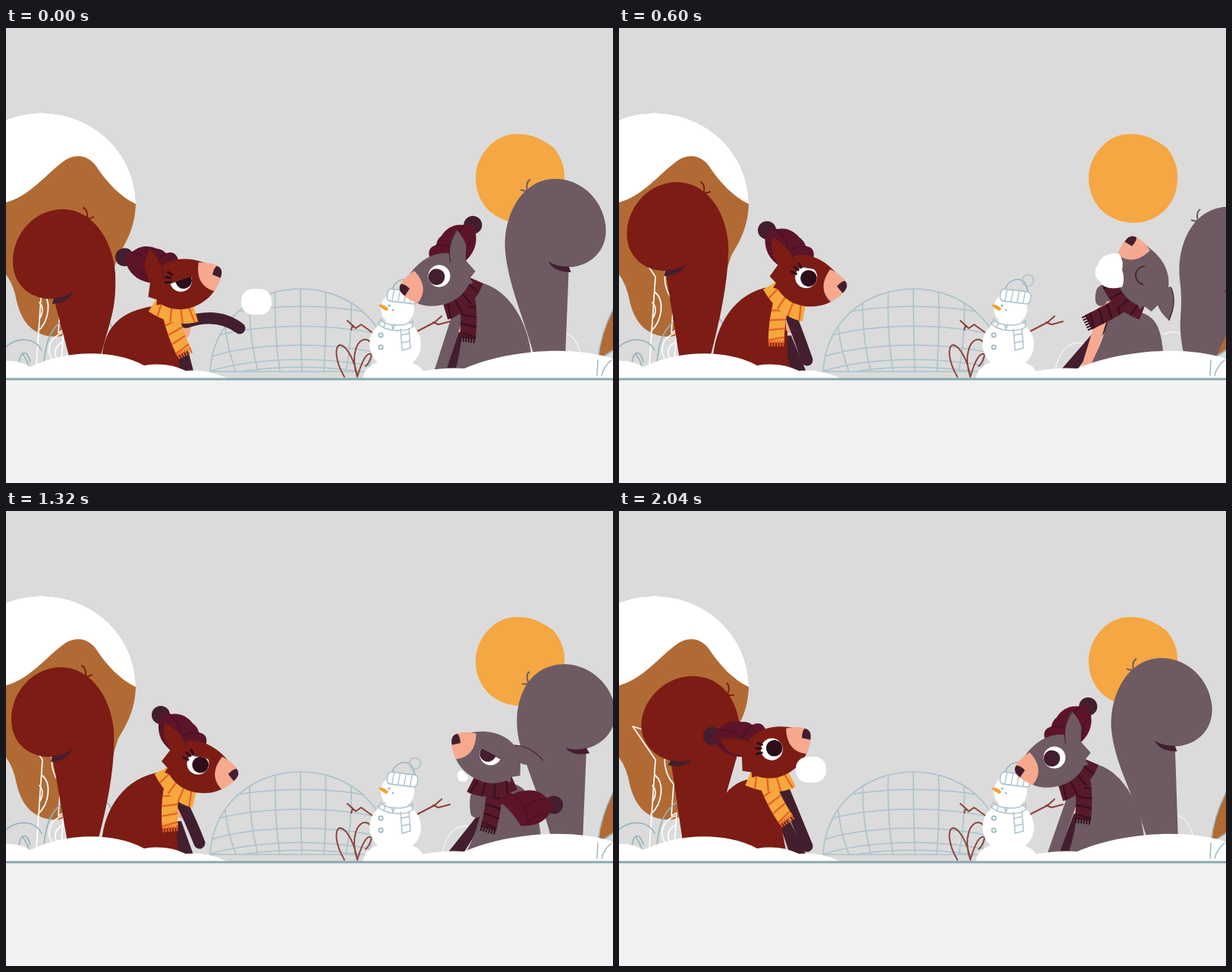
Recreate the animation shown at these times as an HTML page with a canvas. Size 800x600 px, loop 2160 ms.

```html
<!DOCTYPE html>
<html lang="en">
<head>
<meta charset="utf-8">
<title>Snowball fight</title>
<style>
html, body { margin: 0; width: 100%; height: 100%; overflow: hidden; background: #dbdbdb; }
canvas { display: block; width: 800px; height: 600px; }
</style>
</head>
<body>
<canvas id="stage" width="800" height="600"></canvas>
<script>
const c = document.getElementById('stage').getContext('2d');
const LOOP = 2160, STEP = 60;
const HOLDS = [1560, 1860, 1980, 2100];
const RAD = Math.PI / 180;
const DARK = '#431e2e', INK = '#2d0d19', WINE = '#5c1429', PINK = '#f6a98f';
const ICE = '#a9c3cd', TEAL = '#94b3bb', BROWN = '#b16a34';

const clamp = v => Math.max(0, Math.min(1, v));
const mix = (a, b, k) => a + (b - a) * k;

function spin(x, y, deg) {
  const cos = Math.cos(deg * RAD), sin = Math.sin(deg * RAD);
  return [x * cos - y * sin, x * sin + y * cos];
}
function fill(d, color) { c.fillStyle = color; c.fill(new Path2D(d)); }
function line(d, color, width = 2, cap = 'round') {
  c.strokeStyle = color; c.lineWidth = width; c.lineCap = cap; c.lineJoin = 'round';
  c.stroke(new Path2D(d));
}
function oval(x, y, rx, ry, color) {
  c.fillStyle = color; c.beginPath(); c.ellipse(x, y, rx, ry, 0, 0, 7); c.fill();
}
function dot(x, y, r, color) { oval(x, y, r, r, color); }
function ring(x, y, r, color, from = 0, to = 7) {
  c.strokeStyle = color; c.lineWidth = 1.6; c.beginPath(); c.arc(x, y, r, from, to); c.stroke();
}
function at(x, y, deg, draw) {
  c.save(); c.translate(x, y); c.rotate(deg * RAD); draw(); c.restore();
}

// A pose places the eye, tail and front hand; the rest of the body follows.
// The grey squirrel is mirrored, so its x counts from the right edge.
const still = { rot: 0, ear: 0, cap: 0, lid: 0, swing: 0, reach: 0, slip: 0, turn: 0 };

const sit = { ...still, x: 254, y: 335, swing: -2, handX: 248, handY: 438, base: 126, root: 81, tailX: 73, tailY: 269 };
const red = {
  fur: '#7c1c14', arm: DARK, backArm: '#6a1a1a', scarf: '#f6a73d', stripe: '#e65f27',
  lash: true, foot: 237, rear: [136, 346],
  keys: [
    [0, { ...sit, x: 231, y: 334, rot: -30, ear: 50, lid: .5, swing: 20, handX: 308, handY: 396, root: 84, tailX: 76, tailY: 301 }],
    [180, { ...sit, x: 280, y: 364, rot: 4, ear: 46, cap: 24, lid: 1, swing: -66, handX: 330, handY: 450, reach: 1, base: 134, tailX: 45, tailY: 297, turn: -24 }],
    [420, { ...sit, x: 242, y: 326, rot: -4, ear: 6, lid: .18, swing: -10, base: 122, root: 79, tailX: 81, tailY: 263, turn: 6 }],
    [840, sit],
    [1140, { ...sit, lid: .45, handX: 262 }],
    [1500, { ...sit, x: 252, y: 333, tailX: 75, tailY: 267 }],
    [2040, { ...sit, x: 202, y: 315, rot: -40, swing: 28, handY: 442, base: 120, root: 84, tailX: 98, tailY: 280, turn: 18 }]
  ]
};

const lean = { ...still, x: 229, y: 328, rot: 4, ear: 28, handX: 229, handY: 456, base: 107, root: 63, tailX: 77, tailY: 261, turn: 6 };
const slump = { ...still, x: 121, y: 319, rot: -71, ear: -71, lid: 1, swing: 18, slip: 1, handX: 135, handY: 410, base: 82, root: 14, tailX: 16, tailY: 284, turn: 10 };
const grey = {
  fur: '#6d5a62', arm: '#6d5a62', backArm: DARK, scarf: '#571a2a', stripe: '#34111f',
  lash: false, foot: 211, rear: [155, 280],
  keys: [
    [0, lean],
    [180, { ...lean, x: 180, y: 317, rot: -72, ear: 10, lid: 1, swing: 35, handX: 222, base: 101, root: 45, tailX: 36, tailY: 279, turn: 0 }],
    [420, { ...slump, x: 98, y: 331, rot: -93, ear: -48, swing: 90, reach: 1, handX: 184, handY: 326, tailX: -14, tailY: 307 }],
    [840, slump],
    [1140, { ...slump, x: 111, y: 323, rot: -79, tailX: 13 }],
    [1500, { ...lean, x: 213, y: 320, rot: 0, ear: 0, handX: 226, handY: 384, root: 66, tailX: 118, tailY: 245, turn: 28 }],
    [2040, { ...lean, x: 226, y: 326, tailX: 86, tailY: 256 }]
  ]
};

function poseAt(keys, t) {
  const i = keys.findLastIndex(([time]) => time <= t);
  const [t0, a] = keys[i], [t1, b] = keys[i + 1] || [LOOP, keys[0][1]];
  const k = (t - t0) / (t1 - t0), ease = k * k * (3 - 2 * k), out = {};
  for (const name in a) out[name] = mix(a[name], b[name], ease);
  return out;
}

// A striped scarf piece along a quadratic curve.
function band(who, [x0, y0], [qx, qy], [x1, y1], fringe) {
  const width = 21, count = 4;
  line(`M${x0},${y0}Q${qx},${qy} ${x1},${y1}`, who.scarf, width, 'butt');
  for (let i = 0; i < count; i++) {
    const k = (i + .6) / count;
    const ax = mix(x0, qx, k), ay = mix(y0, qy, k), bx = mix(qx, x1, k), by = mix(qy, y1, k);
    at(mix(ax, bx, k), mix(ay, by, k), Math.atan2(by - ay, bx - ax) / RAD,
      () => line(`M-2,${-width / 2}L2,${width / 2}`, who.stripe, 2.2, 'butt'));
  }
  if (!fringe) return;
  at(x1, y1, Math.atan2(y1 - qy, x1 - qx) / RAD, () => {
    for (let y = -9; y <= 9; y += 3.6) line(`M-3,${y}H5`, who.stripe, 2, 'butt');
  });
}

function tail(who, p) {
  const w = (x, y) => {
    const [dx, dy] = spin(x, y, p.turn);
    return `${p.tailX + dx},${p.tailY + dy} `;
  };
  const end = p.root + 40;
  fill(`M${w(-13, 56)}C${w(-43, 58)}${w(-67, 38)}${w(-67, 7)}C${w(-67, -30)}${w(-38, -62)}${w(-1, -62)}` +
    `C${w(37, -62)}${w(65, -22)}${w(68, 22)}C${w(70, 70)}${end + 13},385 ${end},436H${p.root}Z`, who.fur);
  fill(`M${w(-15, 63)}L${w(-13, 55)}Q${w(1, 55)}${w(13, 46)}Q${w(7, 61)}${w(-15, 63)}Z`, DARK);
  at(p.tailX, p.tailY, p.turn, () => line('M26,-64Q32,-61 31,-50L34,-48M31,-50Q36,-50 39,-52', who.fur));
}

function hat() {
  dot(-32, -37, 12, DARK);
  fill('M-16,12C-30,2 -36,-10 -35,-25C-34,-38 -26,-41 -18,-38C-6,-40 4,-34 10,-26Q17,-21 18,-14C30,-12 30,-2 26,6C10,4 -2,8 -16,12Z', WINE);
  line('M18,-14Q-4,-14 -22,4M-20,-37Q-8,-28 -5,-12M-32,-22Q-24,-16 -20,0', '#451023', 1.3);
}

function eye(who, lid) {
  if (lid > .85) {
    if (who.lash) ring(0, 2, 8, PINK, .9, 2.9);
    else ring(0, 0, 12, DARK, -.1, 2.9);
  } else {
    c.save();
    c.beginPath(); c.arc(0, -1, 14.5, 0, 7); c.clip();
    at(0, -1, lid ? 12 : 0, () => {
      const top = -16 + 30 * lid;
      c.beginPath(); c.rect(-20, top, 40, 40); c.clip();
      c.fillStyle = '#fff'; c.fillRect(-20, -20, 40, 40);
      dot(3.5, 1, 10.8, who.lash ? INK : DARK);
      if (lid) line(`M-18,${top}H18`, INK, 1.5);
    });
    c.restore();
  }
  if (who.lash) line('M-13,-6L-19,-9M-10,-11L-15,-15M-6,-14L-9,-19', INK, 3);
}

function head(who, p, snow) {
  at(p.x - 10 * p.slip, p.y + 170 * p.slip, p.rot, () => at(-17, -28, p.cap, hat));
  at(p.x, p.y, p.rot, () => {
    band(who, [-48, 8], [-31, 41], [-5, 47]);
    fill('M-48,-4L-34,-22C-25,-30 -10,-32 0,-30C15,-28 28,-18 36,-9L52,8Q54,16 46,22C35,32 25,38 8,38C-15,38 -30,27 -38,13L-44,11L-40,5Z', who.fur);
    fill('M32,-10C42,-5 50,2 53,9C54,16 48,25 31,33Q13,14 32,-10Z', PINK);
    fill('M40,13Q46,6 51,6Q57,14 47,22Z', DARK);
    eye(who, p.lid);
    at(10, 46, 0, () => {
      c.scale(snow, snow);
      fill('M-22,-15Q-11,-20 0,-17Q12,-21 22,-15C26,2 17,12 10,14C4,21 -8,20 -13,13C-21,11 -25,-3 -22,-15Z', '#fff');
    });
    at(-26, -24, p.ear, () => {
      fill('M-18,-32Q-21,-16 -17,-6L-6,10L12,2C8,-14 -4,-25 -18,-32Z', who.fur);
      line('M-18,-31C-4,-24 7,-14 11,0', '#4a1726', 1);
    });
  });
}

function squirrel(who, t, snow) {
  const p = poseAt(who.keys, t);
  const joint = (x, y) => {
    const [dx, dy] = spin(x, y, p.rot);
    return [p.x + dx, p.y + dy];
  };
  const [nx, ny] = joint(-48, 10), [tx, ty] = joint(-22, 50), [sx, sy] = joint(-35, 34);
  const front = p.base + 102;
  const limb = (x, y, lift, color) =>
    line(`M${tx},${ty}Q${(tx + x) / 2 + lift / 3},${(ty + y) / 2 - lift} ${x},${y}`, color, 15);

  tail(who, p);
  if (p.reach > .02) limb(mix(tx, who.rear[0], p.reach), mix(ty, who.rear[1], p.reach), 0, who.backArm);
  fill(`M${tx - 12},${ty + 25}H${tx}L${who.foot + 11},456H${who.foot - 11}Z`, DARK);

  // The belly shows as the head tips back.
  const bare = .2 + .8 * clamp((-p.rot - 40) / 30);
  const belly = () => line(`M${tx},${ty}L${mix(tx, front + 2, bare)},${mix(ty, 456, bare)}`, PINK, 14);
  if (!who.lash) belly();
  fill(`M${p.base},440C${p.base + 2},392 ${mix(p.base, nx, .4)},${ny + 6} ${nx},${ny}L${tx},${ty}Q${tx - 10},${ty + 26} ${front},456H${p.base}Z`, who.fur);
  if (who.lash) belly();

  limb(p.handX, p.handY, Math.max(0, 60 - p.handY + ty) * .35, who.arm);
  const [ex, ey] = spin(0, 50, -p.swing);
  band(who, [sx, sy], [sx + ex / 2 - 3, sy + ey / 2], [sx + ex, sy + ey], true);
  head(who, p, snow);
}

function backdrop() {
  c.fillStyle = '#dbdbdb'; c.fillRect(0, 0, 800, 600);
  fill('M619,198C619,170 640,146 662,141C688,136 706,146 722,158C733,172 737,186 736,200C735,235 708,257 678,257C642,256 619,230 619,198Z', '#f4a742');
  fill('M0,121A124,120 0 0 1 171,232C170,262 160,280 148,300C139,325 140,340 126,356C110,375 92,404 68,407C34,408 20,385 14,360Q10,338 0,325Z', BROWN);
  fill('M0,121A124,120 0 0 1 171,232C150,222 134,204 122,187C110,166 90,164 73,178C50,196 30,222 0,230Z', '#fff');
  line('M18,284L48,328L40,445M18,284L34,289L36,296M64,314C56,328 62,350 72,360L69,402L76,398L73,440M47,348C60,358 58,385 42,400M44,362Q52,370 44,384M64,442C50,425 58,408 74,402M67,436Q60,424 74,414M118,297Q129,298 124,314', '#fff', 1.7);
  line('M0,420C16,407 38,408 47,425M17,445C18,424 28,424 32,440M22,430Q28,438 30,446M50,440C53,408 62,392 82,380C108,368 138,372 143,408', TEAL, 1.6);
  line('M575,450C582,420 600,408 618,420M682,376Q696,380 703,396M718,404C735,396 750,402 757,430', '#f5f5f5', 1.4);
  fill('M800,370Q784,402 781,437L800,424ZM800,436L790,449L800,450Z', BROWN);
  line('M800,372Q784,402 780,438L778,458M781,437L802,424M785,458Q788,442 802,434', TEAL, 1.5);
}

function dome() {
  const shape = new Path2D('M269,453C272,388 325,344 388,344C452,344 504,388 507,453Z');
  c.save();
  c.clip(shape);
  for (let i = -3; i <= 3; i++) {
    const top = 388 + 33 * i, foot = 390 + 29 * i;
    line(`M${top},344Q${top + i * 2},400 ${foot},453`, ICE, 1.6);
  }
  for (const y of [367, 393, 418, 437, 447])
    line(`M260,${y + 19}C320,${y - 6} 456,${y - 6} 516,${y + 19}`, ICE, 1.6);
  c.restore();
  c.strokeStyle = ICE; c.lineWidth = 1.7; c.stroke(shape);
}

function snowman() {
  line('M446,460C434,440 432,418 441,418C450,420 460,440 463,460C453,430 464,408 475,411C488,414 482,440 474,446M463,460C470,436 476,428 481,430', '#8b473f');
  line('M482,401L468,391L461,396L450,386M457,392L455,398M540,401L565,388L574,380M563,388L570,391L585,387', '#8f4038');
  oval(513, 417, 34, 33, '#fff');
  dot(516, 370, 22, '#fff');
  fill('M470,463C472,448 484,440 500,440H528C545,442 552,452 552,463Z', '#fff');
  line('M509,345C512,333 526,327 535,336L540,350', TEAL, 1.6);
  ring(539, 333, 7.5, ICE);
  at(522.5, 354, 7, () => {
    c.fillStyle = '#fff'; c.beginPath(); c.roundRect(-20, -8, 40, 16, 5); c.fill(); c.stroke();
    for (let x = -12; x <= 12; x += 8) line(`M${x},-8L${x - 1},8`, ICE, 1.3);
  });
  fill('M491,365Q498,364 504,370L502,373Q494,370 491,365Z', '#f4a030');
  dot(505, 366, 1.6, TEAL); dot(510, 372, 1.3, TEAL);
  line('M494,384C500,393 525,395 536,386M490,390C500,400 526,402 536,394M494,384L490,390M536,386V394M500,389L498,394M508,391L510,397L512,391M520,397L522,425L533,422L531,396M521,405L531,403M522,415L532,413', ICE, 1.5);
  ring(494, 405, 2.7, TEAL); ring(494, 421, 2.7, TEAL);
}

function ground() {
  fill('M0,439Q18,438 32,447C70,428 135,420 182,445Q212,440 237,452Q265,449 292,462H0Z', '#fff');
  fill('M470,462Q486,450 512,452L552,452Q580,447 604,449C660,425 745,418 800,436V462Z', '#fff');
  line('M779,458L780,438M785,458Q788,446 798,438', TEAL, 1.4);
  c.fillStyle = '#f2f2f2'; c.fillRect(0, 462, 800, 138);
  c.fillStyle = '#89a7af'; c.fillRect(0, 461.5, 800, 3);
}

function snowball(t) {
  let x, y;
  if (t < 180) {
    x = 330 + t * 1.45; y = 361 - t * .28;
  } else if (t >= 1800) {
    const k = (t - 1800) / 240;
    x = 257 - 4 * k; y = 446 - 105 * k;
  } else return;
  c.fillStyle = '#fff'; c.beginPath(); c.roundRect(x - 20, y - 17, 40, 34, 15.5); c.fill();
}

function splash(t) {
  if (t < 240 || t > 480) return;
  const s = mix(.3, 1, (t - 240) / 180);
  c.save();
  c.translate(610 * (1 - s), 320 * (1 - s)); c.scale(s, s);
  line('M500,307L534,298', '#fff', 10);
  oval(544, 303, 17, 13, '#fff');
  line('M576,273L592,280M551,346L595,326', '#fff', 16);
  c.restore();
}

function draw(t) {
  backdrop();
  dome();
  snowman();
  squirrel(red, t, 0);
  c.save();
  c.translate(800, 0); c.scale(-1, 1);
  squirrel(grey, t, t < 180 ? 0 : clamp((1380 - t) / 180));
  c.restore();
  snowball(t);
  splash(t);
  ground();
}

const start = performance.now();
function tick() {
  let t = Math.floor((performance.now() - start) % LOOP / STEP) * STEP;
  if (HOLDS.includes(t)) t -= STEP;
  draw(t);
  requestAnimationFrame(tick);
}
tick();
</script>
</body>
</html>
```
